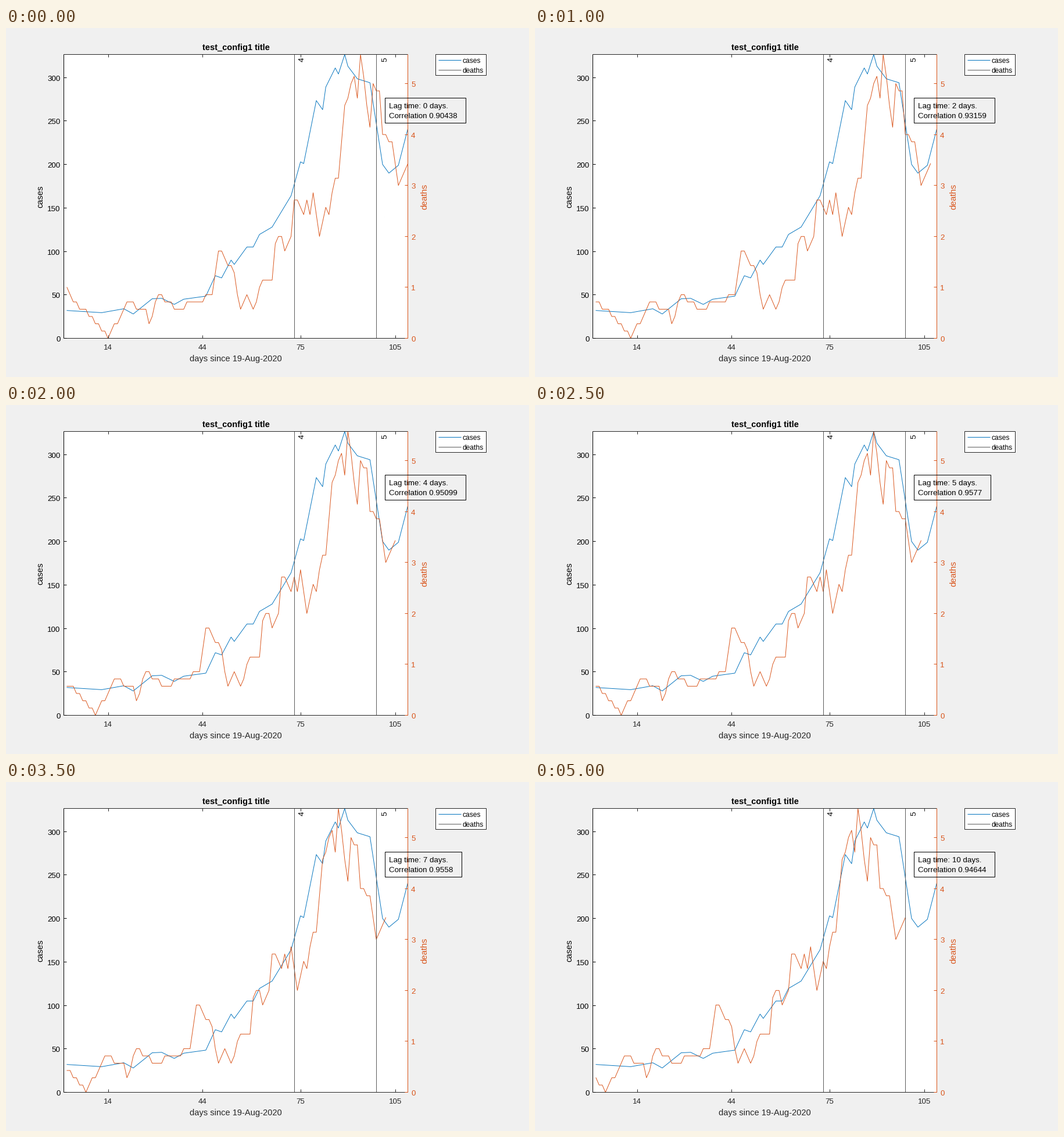
Recreate the animation shown at these times as a matplotlib script. Size 900x600 px, loop 5.5 s.

```python
import numpy as np
import matplotlib.pyplot as plt
from matplotlib.animation import FuncAnimation
from matplotlib.patches import Rectangle

plt.rcParams["font.family"] = "Liberation Sans"

W, H, DPI = 900, 600, 100
PX = 72 / DPI  # points per pixel
LEFT, RIGHT, TOP, BOTTOM = 99, 691, 45, 533
DAYS, CASES_MAX, DEATHS_MAX = 109, 326.5, 39 / 7
BLUE, ORANGE, DARK, GREY = "#0072bd", "#d95319", "#262626", "#5c5c5c"

# Turning points: (day, cases) and (day, deaths in a week)
CASE_KEYS = [
    (1, 32), (12, 29.5), (19, 34), (22, 28), (28, 45.5), (31, 46), (35, 39),
    (38, 45), (45, 48.5), (48, 72), (50, 69.5), (53, 90), (54, 85),
    (58, 105), (60, 105), (62, 119.5), (66, 128), (72, 164), (75, 203),
    (76, 201), (80, 273.5), (82, 263), (83, 289), (86, 311), (87, 304),
    (89, 326.5), (90, 313), (93, 298.5), (97, 294), (101, 200),
    (103, 190), (106, 199), (109, 241)]
DEATH_KEYS = [
    (1, 7), (3, 5), (7, 4), (14, 0), (20, 5), (26, 4), (27, 2), (30, 6),
    (36, 4), (47, 6), (49, 12.4), (54, 9), (56, 4), (58, 6), (60, 4),
    (63, 8), (66, 8), (67, 13), (69, 14), (70, 12), (72, 14), (73, 19),
    (74, 19), (76, 17), (77, 19), (78, 17), (79, 20), (81, 14), (83, 18),
    (84, 17), (86, 22), (87, 22), (89, 32), (92, 36), (93, 33), (94, 39),
    (97, 29), (98, 35), (100, 34), (101, 28), (104, 27), (106, 21),
    (109, 24)]
CORRELATION = [0.90438, 0.91893, 0.93159, 0.94214, 0.95099, 0.9577,
               0.95834, 0.9558, 0.95437, 0.95231, 0.94644]

days = np.arange(1, DAYS + 1)
cases = np.interp(days, *zip(*CASE_KEYS))
# Whole deaths per week give the stepped daily average
deaths = np.round(np.interp(days, *zip(*DEATH_KEYS))) / 7


def day_x(day):
    return LEFT + 0.5 + day / DAYS * (RIGHT - LEFT)


def value_y(value, top):
    return BOTTOM + 0.5 - value / top * (BOTTOM - TOP)


fig = plt.figure(figsize=(W / DPI, H / DPI), dpi=DPI, facecolor="#f0f0f0")
ax = fig.add_axes([0, 0, 1, 1])
ax.set_xlim(0, W)
ax.set_ylim(H, 0)
ax.axis("off")


def text(x, y, s, size=13.33, color="black", ha="left", **kw):
    return ax.text(x, y, s, fontsize=size * PX, color=color, ha=ha,
                   va="baseline", rotation_mode="anchor", zorder=6, **kw)


def segment(x0, y0, x1, y1, color, z=4):
    ax.plot([x0, x1], [y0, y1], color=color, lw=PX, zorder=z,
            solid_capstyle="butt")


def box(x0, y0, x1, y1, face, edge, z=5):
    patch = Rectangle((x0, y0), x1 - x0, y1 - y0, facecolor=face,
                      edgecolor=edge, lw=PX, zorder=z)
    return ax.add_patch(patch)


# Plot area and rulers
area = box(LEFT, TOP, RIGHT, BOTTOM, "white", "none", 1)
segment(LEFT, TOP, RIGHT, TOP, DARK)
segment(LEFT, BOTTOM, RIGHT, BOTTOM, DARK)
segment(LEFT, TOP, LEFT, BOTTOM, "black")
segment(RIGHT, TOP, RIGHT, BOTTOM, ORANGE)

for day in (14, 44, 75, 105):
    x = day_x(day)
    segment(x, BOTTOM, x, BOTTOM - 5, DARK)
    segment(x, TOP, x, TOP + 5, DARK)
    text(x, 553, str(day), color=DARK, ha="center")
for n in range(0, 301, 50):
    y = value_y(n, CASES_MAX) - 0.5
    segment(LEFT, y, LEFT + 5, y, "black")
    text(93.5, y + 6, str(n), ha="right")
for n in range(6):
    y = value_y(n, DEATHS_MAX) - 0.5
    segment(RIGHT - 5, y, RIGHT, y, ORANGE)
    text(697, y + 6, str(n), color=ORANGE)

text(395.5, 38, "test_config1 title", 14.67, ha="center", weight="bold")
text(395.5, 573, "days since 19-Aug-2020", 14.67, DARK, "center")
text(63, 289.5, "cases", 14.67, ha="center", rotation=90)
text(724.5, 289.5, "deaths", 14.67, ORANGE, "center", rotation=90)

# Marked days
for day, name, base in ((73, "4", 513), (99, "5", 655)):
    x = day_x(day)
    segment(x, TOP, x, BOTTOM, GREY, 3.5)
    text(base, 54.5, name, ha="center", rotation=90)

# Legend
box(739, 45, 826, 81, "white", DARK)
for y, name, color in ((55, "cases", BLUE), (72, "deaths", GREY)):
    segment(744, y, 783, y, color, 6)
    text(786, y + 5, name, 12)

# Curves
curve_x = day_x(days)
deaths_y = value_y(deaths, DEATHS_MAX)
ax.plot(curve_x, value_y(cases, CASES_MAX), color=BLUE, lw=0.95 * PX,
        zorder=2, clip_path=area)
deaths_line, = ax.plot([], [], color=ORANGE, lw=0.95 * PX, zorder=3)
deaths_line.set_clip_path(area)

# Read-out
note = box(652, 120, 791, 163, "none", "black")
lag_text = text(659, 138, "")
corr_text = text(659, 155, "")


def update(lag):
    deaths_line.set_data(curve_x[:DAYS - lag], deaths_y[lag:])
    value = str(CORRELATION[lag])
    lag_text.set_text(f"Lag time: {lag} days.")
    corr_text.set_text(f"Correlation {value}")
    note.set_width(139 if len(value) == 7 else 132)
    return deaths_line, lag_text, corr_text, note


anim = FuncAnimation(fig, update, frames=11, interval=500, repeat=True,
                     repeat_delay=0, blit=False)
plt.show()
```
